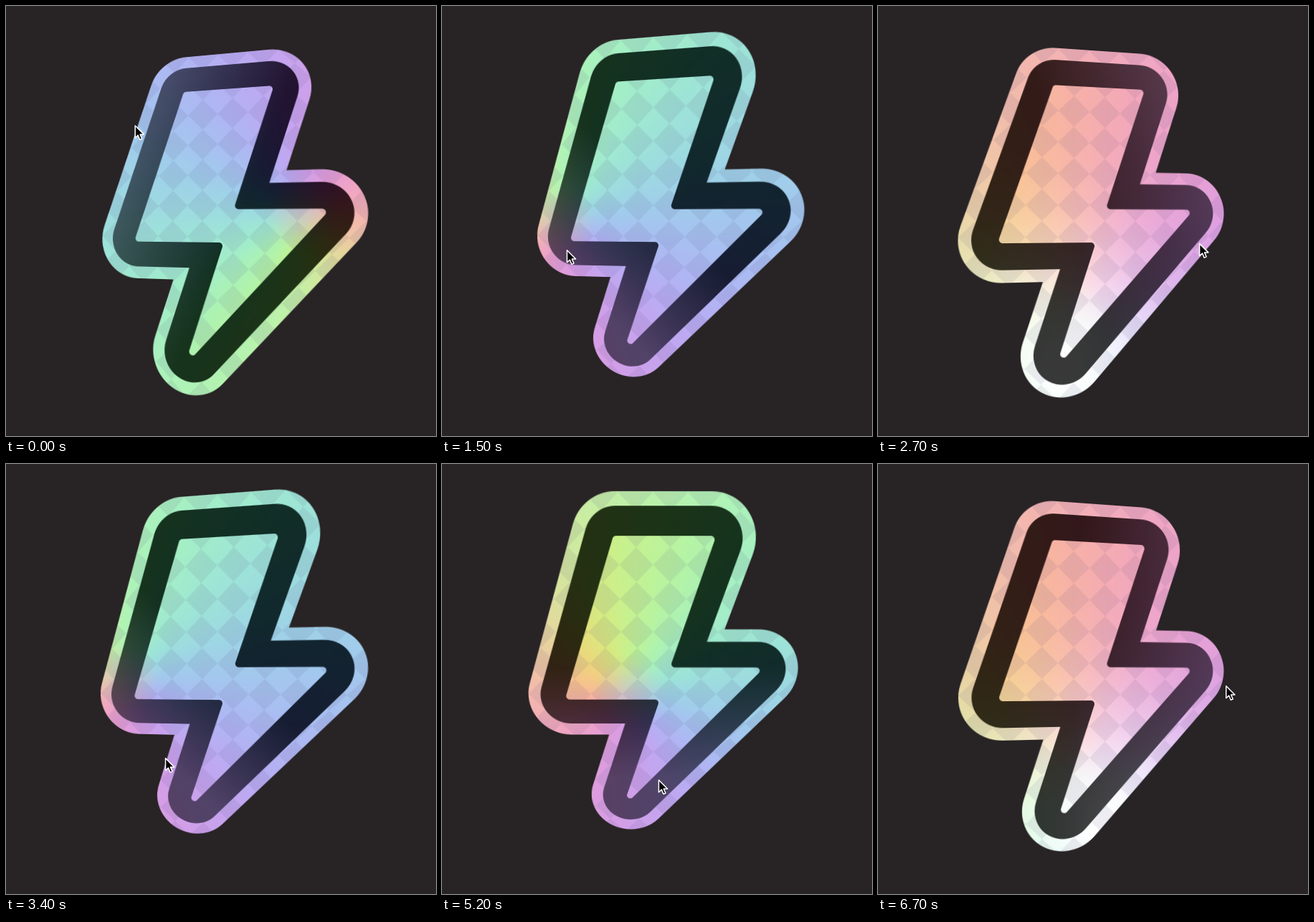
Animation of 600x600 px, one loop 6800 ms. Source, as an HTML page with a canvas:

```html
<!DOCTYPE html>
<html lang="en">
<head>
<meta charset="utf-8">
<title>Holographic bolt sticker</title>
<style>
  html, body { margin: 0; width: 100%; height: 100%; overflow: hidden; background: #282325; }
  #stage { position: absolute; left: 0; top: 0; width: 600px; height: 600px; overflow: hidden; }
  #sticker, #pointer { position: absolute; left: 0; top: 0; width: 600px; height: 600px; }
</style>
</head>
<body>
<div id="stage">
  <canvas id="sticker" width="1200" height="1200"></canvas>
  <svg id="pointer" viewBox="0 0 600 600">
    <path id="arrow" d="M0 0V17L3.9 13.4L6.5 19.6L9.5 18.3L6.9 12.3H12.2Z"
      fill="#000" stroke="#fff" stroke-width="1.5" stroke-linejoin="round"/>
  </svg>
</div>
<script>
const LOOP = 6800, STEP = 100, DEPTH = 600, RAD = Math.PI / 180;

// The pointer circles the sticker and the tilt follows it:
// time, tilt angle, pointer angle, pointer distance (degrees run clockwise from the right)
const orbit = [
  [0, 201, 228, 179], [1500, 498, 522, 132], [2100, 650, 645, 160], [2700, 709, 732, 152],
  [3400, 853, 845, 135], [4300, 1004, 1002, 154], [4600, 1080, 1080, 55], [4900, 1150, 1150, 135],
  [5200, 1160, 1169, 141], [5700, 1255, 1262, 150], [6400, 1390, 1390, 50], [6700, 1443, 1443, 186]
];

// Each foil is a wheel of hues: hue straight above its hub, direction of travel, hub.
// The tilt (+ = right away, + = bottom away) decides which wheel shows.
const foils = [
  { tilt: [-13.2, -5.4],  hue: 272, turn: 1,  hub: [110, -10] },
  { tilt: [-11.3, 11.5],  hue: 122, turn: 1,  hub: [-140, 0] },
  { tilt: [0, 15],        hue: 100, turn: 1,  hub: [-40, 20] },
  { tilt: [10, -1.5],     hue: 355, turn: -1, hub: [-20, 140] },
  { tilt: [1, -14.6],     hue: 285, turn: -1, hub: [-90, 20] }
];

const corners = [[-56, -190], [76, -190], [18, -16.5], [149, -16.5], [-52, 201], [4, 30], [-130, 30]];

const sticker = document.getElementById('sticker');
const arrow = document.getElementById('arrow');
const ctx = sticker.getContext('2d');
const clamp = v => Math.max(0, Math.min(1, v));

function makeCanvas(size) {
  const c = document.createElement('canvas');
  c.width = c.height = size;
  return c;
}

function roundedPath(points, r) {
  const path = new Path2D(), n = points.length;
  const mid = points[0].map((v, i) => (v + points[n - 1][i]) / 2);
  path.moveTo(...mid);
  points.forEach((p, i) => {
    const next = points[(i + 1) % n];
    const prev = i ? points[i - 1] : mid;
    const turn = Math.atan2(next[1] - p[1], next[0] - p[0]) - Math.atan2(prev[1] - p[1], prev[0] - p[0]);
    const cut = r / Math.abs(Math.tan(turn / 2));
    const toward = q => {
      const k = cut / Math.hypot(q[0] - p[0], q[1] - p[1]);
      return [p[0] + (q[0] - p[0]) * k, p[1] + (q[1] - p[1]) * k];
    };
    path.lineTo(...toward(prev));
    path.arcTo(...p, ...toward(next), r);
  });
  path.closePath();
  return path;
}

const bolt = roundedPath(corners, 5);

// Smooth curve through keys of the form [time, ...values]
function follow(keys, t) {
  const last = keys.length - 1;
  let i = 0;
  while (i < last - 1 && t >= keys[i + 1][0]) i++;
  const a = keys[i], b = keys[i + 1], span = b[0] - a[0];
  const u = Math.min(1, (t - a[0]) / span);
  const slope = (k, d) => {
    const p = keys[Math.max(0, k - 1)], q = keys[Math.min(last, k + 1)];
    return (q[d] - p[d]) / (q[0] - p[0]) * span;
  };
  return a.slice(1).map((v, n) => {
    const d = n + 1, ease = u * u * (3 - 2 * u);
    return v + (b[d] - v) * ease + u * (1 - u) ** 2 * slope(i, d) - u * u * (1 - u) * slope(i + 1, d);
  });
}

function foilShares([tx, ty]) {
  const w = foils.map(({ tilt }) => 1 / ((tilt[0] - tx) ** 2 + (tilt[1] - ty) ** 2 + 2) ** 2);
  const sum = w.reduce((a, b) => a + b);
  return w.map(v => v / sum);
}

// Chroma at a point as a vector whose direction is the hue
function chromaAt(x, y, shares) {
  let p = 0, q = 0;
  foils.forEach(({ hue, turn, hub }, i) => {
    const dx = x - hub[0], dy = y - hub[1];
    const h = hue * RAD + turn * Math.atan2(dx, -dy);
    const strength = shares[i] * Math.min(1, Math.hypot(dx, dy) / 50);
    p += strength * Math.cos(h);
    q += strength * Math.sin(h);
  });
  return [p, q];
}

// Coarse colour fields, enlarged smoothly when painted
const GRID = 60, CELL = 600 / GRID;
function makeField() {
  const canvas = makeCanvas(GRID), g = canvas.getContext('2d');
  const image = g.createImageData(GRID, GRID);
  return {
    canvas,
    set(cell, rgb) { image.data.set([...rgb, 255], cell * 4); },
    flush() { g.putImageData(image, 0, 0); }
  };
}
const border = makeField(), outlineField = makeField(), face = makeField();
const fields = [border, outlineField, face];

function updateFields(tilt) {
  const shares = foilShares(tilt);
  const whiteness = shares.reduce((sum, s, i) => sum + (foils[i].turn < 0 ? s : 0), 0);
  for (let cell = 0; cell < GRID * GRID; cell++) {
    const x = (cell % GRID + 0.5) * CELL - 300;
    const y = (Math.floor(cell / GRID) + 0.5) * CELL - 300;
    const [p, q] = chromaAt(x, y, shares);
    const spot = Math.hypot(x - 13 * tilt[1], y - 20 * tilt[0]) / 160;
    const white = whiteness * Math.exp(-spot * spot);
    const rgb = [0, 120, 240].map(a =>
      200 + 55 * white + 43 * (1 - white) * (p * Math.cos(a * RAD) + q * Math.sin(a * RAD)));
    const warm = Math.max(0, p * 0.5 + q * 0.87) * (1 - white);
    const glare = 50 * clamp(((x * tilt[0] + y * tilt[1]) / 13 + 20) / 190);
    border.set(cell, rgb);
    face.set(cell, [rgb[0] + 8 * warm, rgb[1], rgb[2] - 32 * warm]);
    outlineField.set(cell, rgb.map((v, c) => 34 + 0.4 * (v - 200) + glare * (c === 2 ? 1.1 : 0.95)));
  }
  fields.forEach(f => f.flush());
}

function fieldPattern(field) {
  const p = ctx.createPattern(field.canvas, 'no-repeat');
  p.setTransform(new DOMMatrix([CELL, 0, 0, CELL, -300, -300]));
  return p;
}

const diamond = makeCanvas(88);
const tile = diamond.getContext('2d');
tile.fillStyle = 'rgba(90,80,125,.1)';
tile.fill(new Path2D('M44 0L88 44L44 88L0 44Z'));
const checker = ctx.createPattern(diamond, 'repeat');
checker.setTransform(new DOMMatrix([0.5, 0, 0, 0.5, -5, 0]));

function outline(width, paint) {
  ctx.lineWidth = width;
  ctx.strokeStyle = paint;
  ctx.stroke(bolt);
}

function fillBolt(paint) {
  ctx.fillStyle = paint;
  ctx.fill(bolt);
}

// Both tilts foreshorten their own axis and share one perspective, without skew
function tiltMatrix([tx, ty]) {
  const [a, b] = [tx * RAD, ty * RAD];
  return `matrix3d(${[
    Math.cos(a), 0, 0, Math.sin(a) / DEPTH,
    0, Math.cos(b), 0, Math.sin(b) / DEPTH,
    0, 0, 1, 0,
    0, 0, 0, 1
  ].map(v => v.toFixed(8))})`;
}

function render(t) {
  const [lean, angle, radius] = follow(orbit, t);
  const reach = Math.min(1, radius / 130);
  const tilt = [
    reach * (12 * Math.cos(lean * RAD) - 2),
    reach * 15 * Math.sin(lean * RAD)
  ];
  updateFields(tilt);
  ctx.setTransform(2, 0, 0, 2, 600, 600);
  ctx.clearRect(-300, -300, 600, 600);
  ctx.lineJoin = 'round';
  outline(106, fieldPattern(border));
  outline(106, checker);
  outline(72, fieldPattern(outlineField));
  fillBolt(fieldPattern(face));
  fillBolt(checker);
  sticker.style.transform = tiltMatrix(tilt);
  const x = 300 + radius * Math.cos(angle * RAD), y = 300 + radius * Math.sin(angle * RAD);
  arrow.setAttribute('transform', `translate(${x} ${y})`);
}

const start = performance.now();
let shown = -1;
function tick() {
  const t = Math.floor(((performance.now() - start) % LOOP) / STEP) * STEP;
  if (t !== shown) render(shown = t);
  requestAnimationFrame(tick);
}
tick();
</script>
</body>
</html>
```
